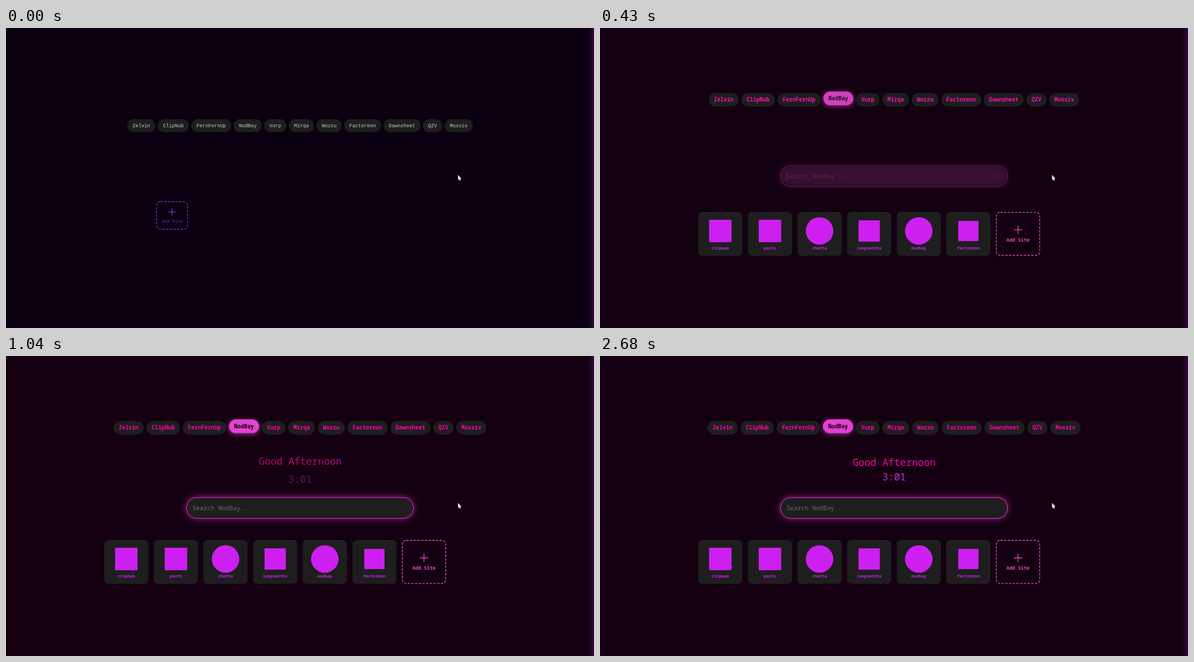
Recreate the animation shown at these times as an HTML page with a canvas. Size 1047 by 535 pixels, loop 3.08 s.

```html
<!DOCTYPE html>
<html lang="en">
<head>
<meta charset="utf-8">
<title>Start page</title>
<style>
  html, body { margin: 0; width: 100%; height: 100%; overflow: hidden; background: #140010; }
  canvas { display: block; }
</style>
</head>
<body>
<canvas id="stage" width="1047" height="535"></canvas>
<script>
const ctx = document.getElementById('stage').getContext('2d');
const LOOP = 3080, SWITCH = 120;
const MONO = '"Noto Sans Mono", "DejaVu Sans Mono", monospace';
const COURIER = '"Liberation Mono", monospace';
const ENGINES = ['Zelvin', 'ClipNub', 'FernFernUp', 'NodBay', 'Vurp', 'Mirqa',
  'Wozzu', 'Factoreon', 'Dawnsheet', 'QZV', 'Mossiv'];
const SELECTED = 3;
const SITES = [
  { label: 'clipnub', size: 40 },
  { label: 'pozti', size: 40 },
  { label: 'chattu', size: 49, round: true },
  { label: 'loopsmiths', size: 38 },
  { label: 'nodbay', size: 49, round: true },
  { label: 'Factoreon', size: 36 },
];
const PANEL = [30, 30, 30], GREY = [204, 204, 204], HOT = [255, 0, 174],
  PINK = [226, 66, 208], VIOLET = [106, 47, 192], ICON = '#cd1fef';

const lerp = (a, b, p) => a + (b - a) * p;
const mix = (a, b, p) => `rgb(${a.map((v, i) => Math.round(lerp(v, b[i], p)))})`;
const bezier = (a, b, u) => 3 * a * u * (1 - u) ** 2 + 3 * b * u * u * (1 - u) + u ** 3;

// The CSS "ease" curve over a span of time
function ease(time, start, duration) {
  const x = Math.min(1, Math.max(0, (time - start) / duration));
  let low = 0, high = 1;
  for (let i = 0; i < 20; i++) {
    const u = (low + high) / 2;
    if (bezier(.25, .25, u) < x) low = u; else high = u;
  }
  return x === 1 ? 1 : bezier(.1, 1, low);
}

function roundRect(x, y, w, h, r) {
  ctx.beginPath();
  ctx.roundRect(x, y, w, h, r);
}

function panel(x, y, w, h, r, color) {
  roundRect(x, y, w, h, r);
  ctx.fillStyle = color;
  ctx.fill();
}

// y is the middle of the capitals
function text(string, x, y, size, color, { weight = 400, family = MONO, align = 'center' } = {}) {
  ctx.font = `${weight} ${size}px ${family}`;
  ctx.textAlign = align;
  ctx.fillStyle = color;
  ctx.fillText(string, x, y + size * .36);
}

function glow(color, blur, dy = 0) {
  ctx.shadowColor = color;
  ctx.shadowBlur = blur;
  ctx.shadowOffsetY = dy;
}

function background(p) {
  ctx.fillStyle = mix([11, 0, 17], [20, 0, 16], p);
  ctx.fillRect(0, 0, 1047, 535);
  const edge = ctx.createLinearGradient(1036, 0, 1047, 0);
  edge.addColorStop(0, 'rgba(62, 8, 76, 0)');
  edge.addColorStop(1, 'rgba(62, 8, 76, .75)');
  ctx.fillStyle = edge;
  ctx.fillRect(1036, 0, 11, 535);
}

function enginePills(p, open) {
  const size = lerp(8.75, 9.8, p), gap = lerp(4.4, 4.9, p), height = lerp(23, 24.5, p);
  const style = open ? { weight: 700 } : { family: COURIER };
  const widths = ENGINES.map(name => name.length * size * .6 + 18.5);
  const total = widths.reduce((a, b) => a + b) + gap * (ENGINES.length - 1);
  const middle = open ? 127.9 : 174;
  let x = 523.5 - total / 2;
  ENGINES.forEach((name, i) => {
    const active = open && i === SELECTED;
    const y = middle - (active ? 2.6 * p : 0);
    if (active) glow(`rgba(226, 66, 208, ${.65 * p})`, 9, 2);
    panel(x, y - height / 2, widths[i], height, height / 2, active ? mix(PANEL, PINK, p) : mix(PANEL, PANEL, 0));
    glow('transparent', 0);
    text(name, x + widths[i] / 2, y, size, mix(GREY, active ? [20, 0, 16] : HOT, p), style);
    x += widths[i] + gap;
  });
}

function addSite(x, y, w, h, plus, plusY, labelY, size, color, style) {
  const middle = x + w / 2;
  ctx.strokeStyle = color;
  ctx.lineWidth = 1.4;
  ctx.setLineDash([4.2, 2.4]);
  roundRect(x + .7, y + .7, w - 1.4, h - 1.4, 7);
  ctx.stroke();
  ctx.setLineDash([]);
  ctx.beginPath();
  ctx.moveTo(middle - plus, plusY);
  ctx.lineTo(middle + plus, plusY);
  ctx.moveTo(middle, plusY - plus);
  ctx.lineTo(middle, plusY + plus);
  ctx.stroke();
  text('Add Site', middle, labelY, size, color, style);
}

function siteCards(p) {
  const y = 328 - 1.2 * (1 - p), step = 88.35, width = 78.5;
  SITES.forEach(({ label, size, round }, i) => {
    const x = 175 + i * step, middle = x + width / 2;
    panel(x, y, width, 78.3, 7.5, mix(PANEL, PANEL, 0));
    panel(middle - size / 2, y + 34 - size / 2, size, size, round ? size / 2 : 0, ICON);
    text(label, middle, y + 64, 7.35, '#c42ae2', { weight: 700 });
  });
  addSite(175 + 6 * step, y, width, 78.3, 7.3, y + 32, y + 50, 8.6,
    mix(VIOLET, [234, 70, 208], Math.sqrt(p)), { weight: 700 });
}

function header(time) {
  const box = ease(time, 110, 1080), greet = ease(time, 150, 2000), clock = ease(time, 520, 2000);
  const drop = -14 * (1 - box), alpha = box ** 1.5;

  ctx.globalAlpha = alpha * greet;
  text('Good Afternoon', 523.8, 189.5 + drop - 5 * (1 - greet), 17.6, '#fa00ac');
  ctx.globalAlpha = alpha * clock;
  text('3:01', 523.5, 216 + drop + 7 * (1 - clock), 17.6, '#c42be0');

  ctx.globalAlpha = alpha;
  glow('rgba(226, 30, 190, .75)', 11);
  panel(321, 252 + drop, 405, 38, 19, mix(PANEL, PANEL, 0));
  glow('transparent', 0);
  roundRect(321.5, 252.5 + drop, 404, 37, 18.5);
  ctx.strokeStyle = '#d63ac6';
  ctx.lineWidth = 1;
  ctx.stroke();
  text('Search NodBay...', 332, 271 + drop, 10.95, '#6c6872', { align: 'left' });
  if ((time + 820) % 1000 < 500) {
    ctx.fillStyle = '#777';
    ctx.fillRect(331, 263 + drop, 1, 15);
  }
  ctx.globalAlpha = 1;
}

function pointer() {
  const arrow = new Path2D('M805 262V271.6L807 269.8L808.4 272.4L809.8 271.7L808.6 269.1L811 268.7Z');
  ctx.strokeStyle = '#222';
  ctx.lineWidth = 1;
  ctx.stroke(arrow);
  ctx.fillStyle = '#e4e4e4';
  ctx.fill(arrow);
}

function draw(now) {
  const time = now % LOOP, open = time >= SWITCH;
  const p = ease(time, 170, 400);
  background(p);
  enginePills(p, open);
  if (open) {
    header(time);
    siteCards(p);
  } else {
    addSite(267.5, 309, 56.5, 50.5, 6.3, 328, 344, 7.75, mix(VIOLET, VIOLET, 0), { family: COURIER });
  }
  pointer();
  requestAnimationFrame(() => draw(performance.now() - begin));
}

const begin = performance.now();
draw(0);
</script>
</body>
</html>
```
